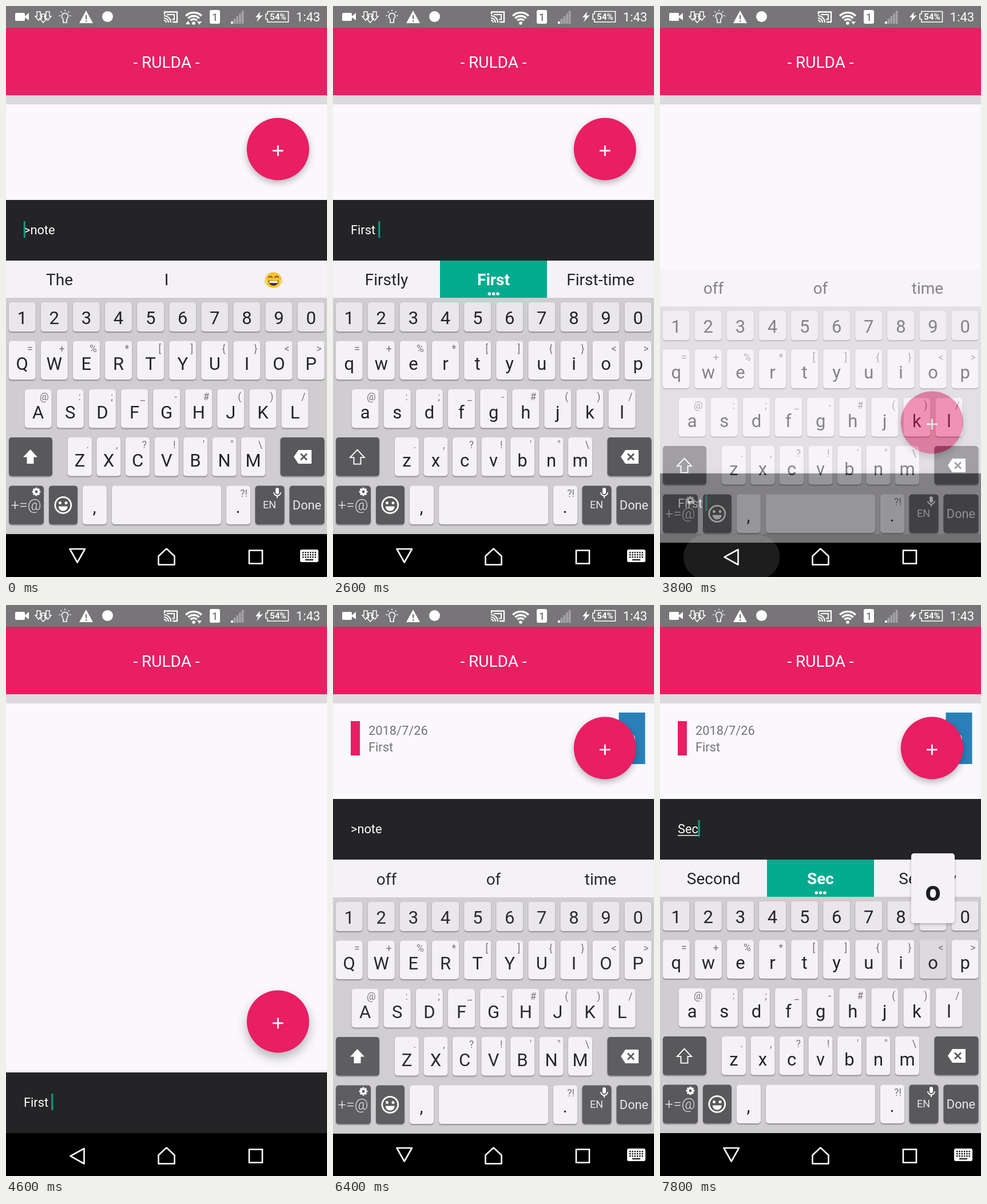
Animation, 561 px wide and 998 px high, one loop 8 s. Source, as an HTML page with a canvas:

```html
<!DOCTYPE html>
<html lang="en">
<head>
<meta charset="utf-8">
<title>Notes</title>
<style>
html, body { margin: 0; width: 100%; height: 100%; overflow: hidden; background: #000; }
canvas { display: block; width: 561px; height: 998px; }
</style>
</head>
<body>
<canvas id="stage" width="561" height="998"></canvas>
<script>
const W = 561, H = 998, LOOP = 8000;
const screen2d = document.getElementById('stage').getContext('2d');
const keyLayer = document.createElement('canvas');
keyLayer.width = W;
keyLayer.height = H;
const key2d = keyLayer.getContext('2d');
let c = screen2d;

const PINK = '#e91e63', TEAL = '#03ab8e', PAPER = '#faf8fc', KEY = '#f4f2f6', DARK = '#59585b', INK = '#242326';

// Each step changes only the listed properties.
const steps = [
  [0, { text: '', cursor: 1, under: '', caps: 1, words: ['The', 'I', ':)'], active: 0, press: '', net: 3,
        open: 1, alpha: 1, dy: 0, ripple: 0, note: 0, lift: 0 }],
  [200, { cursor: 0 }],
  [600, { press: 'F', cursor: 1, net: 0 }],
  [800, { press: '', text: 'F', caps: 0, under: '#fff', words: ['F', 'For', 'First'], active: 1 }],
  [1000, { text: 'Fi', under: '#2f93d9', words: ['Fi', 'First', 'Find'] }],
  [1200, { text: 'Fir', words: ['Fir', 'First', 'Fire'] }],
  [1400, { text: 'Firs', words: ['Firs', 'First', 'Firstly'] }],
  [1600, { text: 'First', under: '#fff', words: ['Firstly', 'First', 'First-time'] }],
  [2200, { cursor: 0 }],
  [2600, { text: 'First ', cursor: 1, under: '' }],
  [2800, { words: ['off', 'of', 'time'], active: 0, net: 2 }],
  [3200, { cursor: 0 }],
  [3600, { cursor: 1, ripple: 0.7 }],
  [3800, { open: 0, alpha: 0.55, dy: 15, ripple: 1 }],
  [4000, { alpha: 0, ripple: 0.4 }],
  [4200, { cursor: 0, ripple: 0 }],
  [4600, { cursor: 1, lift: 1 }],
  [4800, { text: '', note: 1 }],
  [5000, { lift: 0.5, net: 0 }],
  [5400, { cursor: 0, lift: 0 }],
  [5800, { cursor: 1 }],
  [6000, { open: 1, caps: 1, alpha: 0.35, dy: 25 }],
  [6200, { alpha: 0.8, dy: 6 }],
  [6400, { alpha: 0.97, dy: 1, cursor: 0 }],
  [6600, { alpha: 1, dy: 0, words: ['The', 'I', ':)'] }],
  [6800, { cursor: 1 }],
  [7000, { press: 'S' }],
  [7200, { press: '', text: 'S', caps: 0, under: '#fff', words: ['S', 'So', 'She'], active: 1 }],
  [7400, { text: 'Se', words: ['Se', 'See', 'Send'] }],
  [7600, { text: 'Sec', words: ['Second', 'Sec', 'Security'] }],
  [7800, { press: 'o' }]
];

function stateAt(time) {
  return Object.assign({}, ...steps.filter(s => s[0] <= time).map(s => s[1]));
}

function rect(x, y, w, h, color, r = 0) {
  c.fillStyle = color;
  c.beginPath();
  c.roundRect(x, y, w, h, r);
  c.fill();
}

function circle(x, y, r, color) {
  c.fillStyle = color;
  c.beginPath();
  c.arc(x, y, r, 0, Math.PI * 2);
  c.fill();
}

function trace(points, closed) {
  c.beginPath();
  for (let i = 0; i < points.length; i += 2) c.lineTo(points[i], points[i + 1]);
  if (closed) c.closePath();
}

function poly(points, color) {
  trace(points, true);
  c.fillStyle = color;
  c.fill();
}

function line(points, color, width, closed = false) {
  trace(points, closed);
  c.strokeStyle = color;
  c.lineWidth = width;
  c.stroke();
}

function arc(x, y, r, from, to, color, width) {
  c.beginPath();
  c.arc(x, y, r, from * Math.PI, to * Math.PI);
  c.strokeStyle = color;
  c.lineWidth = width;
  c.stroke();
}

function text(str, x, y, size, color, align = 'left', weight = 400) {
  c.font = `${weight} ${size}px Roboto, sans-serif`;
  c.textAlign = align;
  c.fillStyle = color;
  c.fillText(str, x, y);
}

function shadow(color, blur, y) {
  c.shadowColor = color;
  c.shadowBlur = blur;
  c.shadowOffsetY = y;
}

function noShadow() { shadow('transparent', 0, 0); }

function statusBar(net) {
  const white = '#fff';
  rect(0, 0, W, 38, '#777578');
  rect(16, 12, 17, 14, white, 2);
  poly([33, 18, 40, 12, 40, 25, 33, 20], white);
  for (const [x, y] of [[54, 10], [70, 10], [62, 14]]) {
    line([x, y, x + 6, y, x + 6, y + 8, x + 9, y + 8, x + 3, y + 15, x - 3, y + 8, x, y + 8], white, 1.5, true);
  }
  arc(103, 18, 5.5, 0.7, 2.3, white, 1.7);
  line([100, 23, 100, 29, 106, 29, 106, 23], white, 1.7);
  for (let i = 0; i < 5; i++) {
    const a = Math.PI * (1 + i / 4);
    line([103 + 8 * Math.cos(a), 17 + 8 * Math.sin(a), 103 + 10.5 * Math.cos(a), 17 + 10.5 * Math.sin(a)], white, 1.5);
  }
  poly([140, 8, 152, 30, 128, 30], white);
  rect(139, 16, 2.3, 7, '#777578');
  rect(139, 25, 2.3, 2.5, '#777578');
  circle(177.5, 18.5, 9.5, white);

  line([277, 15, 277, 10.5, 299, 10.5, 299, 28, 291, 28], white, 2.3);
  for (const r of [4, 8, 12]) arc(276, 29, r, 1.5, 2, white, 2.2);
  line([281, 15, 294, 15, 294, 23.5, 290, 23.5], white, 2);
  circle(328, 30, 2.8, white);
  for (const r of [8, 13.5, 19.5]) arc(328, 31, r, 1.25, 1.75, white, 3.5);
  if (net & 1) poly([314, 32, 318, 26, 322, 32], white);
  if (net & 2) poly([334, 27, 342, 27, 338, 32.5], white);
  rect(356, 7, 18, 24, white, 3);
  text('1', 365, 26, 18, '#777578', 'center', 500);
  for (let i = 0; i < 5; i++) {
    const h = 4 + i * 4.6;
    rect(393 + i * 4.7, 31 - h, 3.7, h, i ? '#a5a3a6' : white);
  }
  poly([444, 10, 436, 20, 441, 20, 438, 28, 449, 16, 443, 17], white);
  line([457, 9.5, 493.5, 9.5, 493.5, 28, 457, 28, 457, 23, 454, 23, 454, 14, 457, 14], white, 1.6, true);
  text('54%', 475.5, 24, 15, white, 'center', 700);
  text('1:43', 528, 27, 22, white, 'center');
}

function noteRow(open) {
  rect(31, 203, 16, 60, PINK);
  text('2018/7/26', 62, 227, 21.8, '#767477');
  text('First', 62, 256, 21.8, '#767477');
  rect(499.5, 188, 46, 90, '#2980b9');
  text('D', 522, 242, 21.8, '#fff', 'center');
  if (!open) rect(0, 294, W, 3, '#e8e6ea');
}

function addButton(y, lift) {
  shadow('rgba(0,0,0,.27)', 12 + lift * 6, 5 + lift * 4);
  circle(475.3, y, 54.5, PINK);
  noShadow();
  rect(466, y + 1.5, 18.5, 2.8, '#fff');
  rect(473.9, y - 6.4, 2.8, 18.5, '#fff');
}

function inputBar(s, y) {
  if (!s.open) rect(0, y - 3, W, 3, '#ebe9ed');
  rect(0, y, W, 106, INK);
  text(s.text || '>note', 31, y + 60, 21.8, '#fff');
  const width = s.text ? c.measureText(s.text).width : 0;
  if (s.under) {
    const blue = s.under !== '#fff';
    rect(31, y + 63, width, blue ? 3 : 1.6, s.under);
  }
  if (s.cursor) rect(30.8 + width, y + 37, 3, 29, '#0c9c87');
}

function navBar(s) {
  rect(0, 923, W, 75, '#000');
  if (s.ripple) {
    c.globalAlpha = s.ripple;
    rect(41, 924, 168, 78, '#1d1d1d', 38);
    c.globalAlpha = 1;
  }
  c.lineJoin = 'round';
  line(s.open ? [111.5, 949, 138, 949, 124.7, 972.5] : [136.5, 950, 136.5, 976.5, 112.5, 963.2], '#fff', 2.6, true);
  line([266.5, 961.5, 280.5, 948.5, 294.5, 961.5, 294.5, 976.5, 266.5, 976.5], '#fff', 2.6, true);
  c.lineJoin = 'miter';
  line([425, 951.5, 448, 951.5, 448, 974.5, 425, 974.5], '#fff', 2.6, true);
  if (!s.open) return;
  rect(514, 950, 32, 22, '#fff', 3);
  for (let row = 0; row < 3; row++) {
    for (let i = 0; i < 6; i++) rect(518 + i * 4.3, 954 + row * 4, 2.4, 2.4, '#111');
  }
  rect(523, 967, 14, 2, '#111');
}

function keyCap(x, y, w, h, color = KEY) {
  shadow('rgba(0,0,0,.34)', 2, 1.7);
  rect(x, y, w, h, color, 5);
  noShadow();
}

function hint(str, right, y) { text(str, right - 5, y + 19, 17.5, '#777579', 'right'); }

function keyRow(letters, hints, x, gap, w, y, s) {
  [...letters].forEach((letter, i) => {
    const cx = x + i * gap;
    const label = s.caps ? letter : letter.toLowerCase();
    keyCap(cx - w / 2, y, w, 67.5, s.press === label ? '#dcdadd' : KEY);
    hint(hints[i], cx + w / 2, y);
    text(label, cx, y + 50.5, 31, INK, 'center');
    if (s.press === label) s.popup = [cx, y, label];
  });
}

function joyFace(x, y) {
  c.fillStyle = '#fbc02d';
  c.beginPath();
  c.ellipse(x, y, 14.5, 13.8, 0, 0, Math.PI * 2);
  c.fill();
  for (const side of [-1, 1]) {
    arc(x + side * 5.5, y - 3, 3.4, 1.1, 1.9, '#5d4326', 1.8);
    circle(x + side * 13.5, y + 2.5, 3, '#f5d879');
  }
  c.fillStyle = '#493629';
  c.beginPath();
  c.arc(x, y + 1, 9, 0, Math.PI);
  c.fill();
  rect(x - 7.5, y + 1.5, 15, 3.6, '#fff', 1);
}

function suggestions(s) {
  rect(0, 445, W, 65, KEY);
  if (s.active) rect(187, 445, 187, 65, TEAL);
  s.words.forEach((word, i) => {
    const x = 93.5 + i * 187;
    if (word === ':)') return joyFace(x, 479);
    const chosen = s.active && i === 1;
    const typed = s.active && word === s.text;
    text(word, x, 488, 28, chosen ? '#fff' : typed ? TEAL : INK, 'center', chosen ? 700 : 400);
  });
  if (s.active) for (const x of [273.3, 280.6, 287.9]) circle(x, 503, 2.8, '#fff');
}

function specialKeys(s) {
  keyCap(5, 754, 76, 67.5, DARK);
  const arrow = [42.5, 775, 55, 788.5, 48.5, 788.5, 48.5, 800, 36.5, 800, 36.5, 788.5, 30, 788.5];
  if (s.caps) poly(arrow, '#fff');
  else line(arrow.map((v, i) => v + (i % 2 ? 0.6 : 0)), '#fff', 1.9, true);
  keyCap(479.5, 754, 77, 67.5, DARK);
  poly([503, 788, 511, 776, 534, 776, 534, 800, 511, 800], '#fff');
  line([515, 782.5, 526, 793.5], DARK, 2.8);
  line([526, 782.5, 515, 793.5], DARK, 2.8);

  const y = 838.5, h = 67.5, soft = '#e9e8ea';
  keyCap(5, y, 61, h, DARK);
  text('+=@', 35, 881, 26, soft, 'center', 300);
  for (let i = 0; i < 4; i++) {
    const a = i * Math.PI / 4, dx = 7.3 * Math.cos(a), dy = 7.3 * Math.sin(a);
    line([53 - dx, 849 - dy, 53 + dx, 849 + dy], '#fff', 3.2);
  }
  circle(53, 849, 5.8, '#fff');
  circle(53, 849, 2.4, DARK);

  keyCap(75, y, 50, h, DARK);
  arc(99.8, 872.3, 14, 0, 2, '#fff', 2.8);
  circle(94.5, 868.5, 2.5, '#fff');
  circle(105, 868.5, 2.5, '#fff');
  c.beginPath();
  c.arc(99.8, 874.5, 8, 0, Math.PI);
  c.fill();

  keyCap(134, y, 42, h);
  text(',', 154.5, 886, 31, INK, 'center');
  keyCap(185, y, 191, h);
  keyCap(385, y, 42, h);
  hint('?!', 427, y);
  text('.', 405.5, 886, 31, INK, 'center');
  keyCap(435.5, y, 51, h, DARK);
  text('EN', 460.5, 878, 18, soft, 'center');
  rect(471, 842, 6, 11, '#fff', 3);
  arc(474, 850, 6, 0, 1, '#fff', 1.8);
  rect(473, 856, 2, 4, '#fff');
  keyCap(495.5, y, 61, h, DARK);
  text('Done', 526, 880, 21.8, soft, 'center');
}

function keyboard(s) {
  rect(0, 510, W, 413, '#cfcdd0');
  suggestions(s);
  for (let i = 0; i < 10; i++) {
    const x = 28.2 + i * 56.1;
    keyCap(x - 23.5, 518, 47, 51, '#e9e7eb');
    text((i + 1) % 10, x, 556, 31, INK, 'center');
  }
  keyRow('QWERTYUIOP', '=+%*[]{}<>', 28.2, 56.1, 47, 585.5, s);
  keyRow('ASDFGHJKL', '@:;_-#()/', 56.2, 56.1, 47, 670, s);
  keyRow('ZXCVBNM', '.,?!\'"\\', 129, 50.5, 42, 754, s);
  specialKeys(s);
  if (s.popup) {
    const [x, y, label] = s.popup;
    shadow('rgba(0,0,0,.25)', 5, 2);
    rect(x - 38, y - 151.5, 76, 122, KEY, 5);
    noShadow();
    text(label, x, y - 69, 48, '#1d1c1f', 'center', 700);
  }
}

function draw(s) {
  c = screen2d;
  const barY = s.open ? 339 : 817;
  rect(0, 0, W, H, PAPER);
  rect(0, 38, W, 118, PINK);
  rect(0, 156, W, 16, '#dcdadd');
  text('- RULDA -', 280.5, 108, 28, '#fff', 'center');
  statusBar(s.net);
  if (s.note) noteRow(s.open);
  addButton(barY - 89, s.lift);
  inputBar(s, barY);
  navBar(s);
  if (!s.alpha) return;

  c = key2d;
  c.clearRect(0, 0, W, H);
  keyboard(s);
  screen2d.globalAlpha = s.alpha;
  screen2d.drawImage(keyLayer, 0, s.dy);
  screen2d.globalAlpha = 1;
}

function tick() {
  draw(stateAt(performance.now() % LOOP));
  requestAnimationFrame(tick);
}
tick();
</script>
</body>
</html>
```
